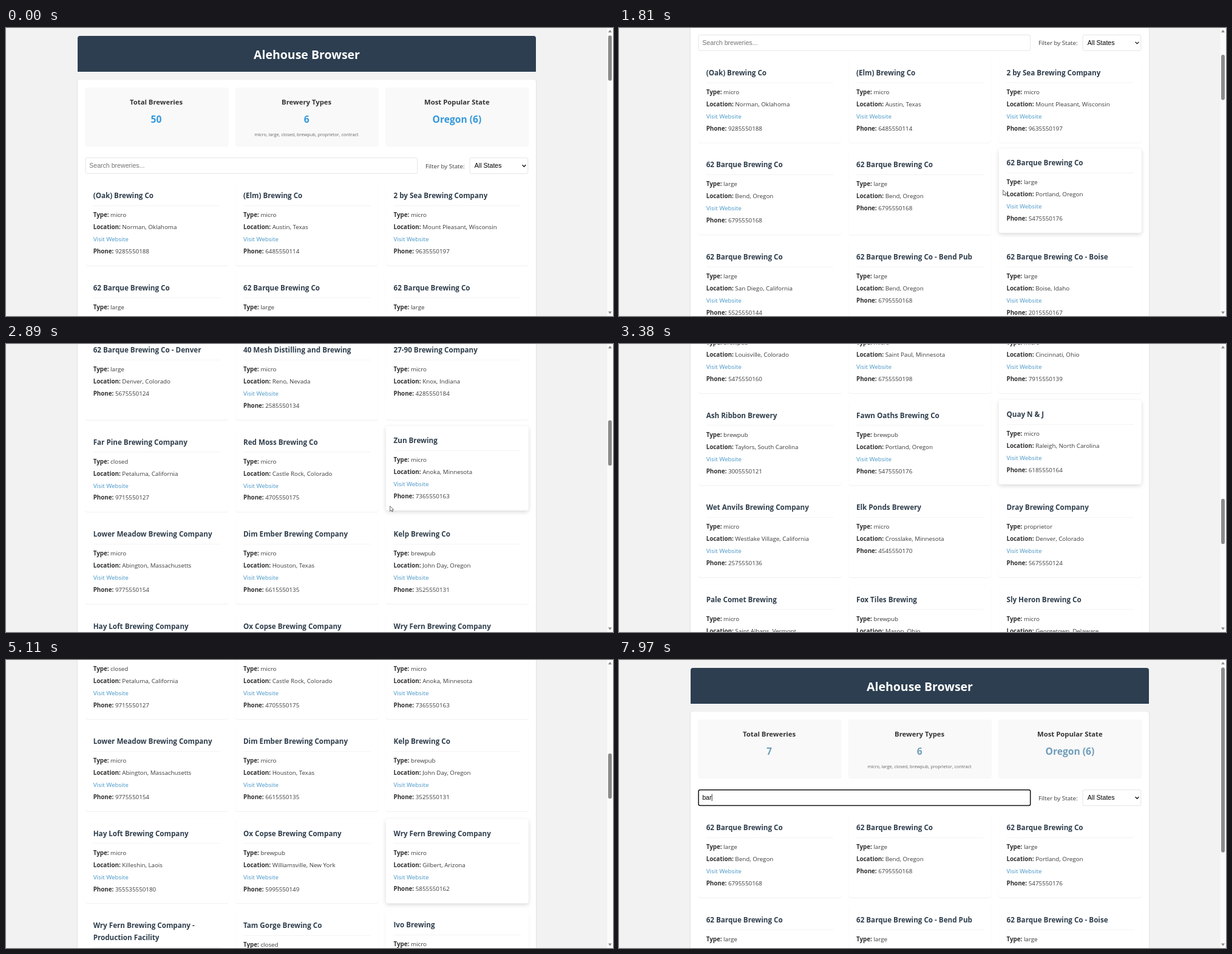
Animation of 1000 by 474 pixels, one loop 8000 ms. Source, as an HTML page:

```html
<!DOCTYPE html>
<html lang="en">
<head>
<meta charset="utf-8">
<title>Alehouse Browser</title>
<style>
  html, body { margin: 0; width: 100%; height: 100%; overflow: hidden; background: #f2f2f2; }
  svg { display: block; width: 100vw; height: 100vh; }
  text { font-family: "Open Sans", "Noto Sans", sans-serif; font-size: 9.8px; fill: #3b3b3b; white-space: pre; }
  .b { font-weight: 700; fill: #303030; }
  .h1 { font-size: 19.5px; font-weight: 700; fill: #fff; text-anchor: middle; }
  .label { font-size: 11.3px; font-weight: 700; fill: #333; text-anchor: middle; }
  .value { font-size: 15.6px; font-weight: 700; text-anchor: middle; }
  .small { font-size: 7.36px; fill: #666; text-anchor: middle; }
  .name { font-size: 11.65px; font-weight: 700; fill: #2f3e4c; }
  .link { fill: #4595c6; }
  .ui { font-family: "Liberation Sans", Arial, sans-serif; font-size: 10.6px; fill: #000; }
  .hint { fill: #757575; }
</style>
</head>
<body>
<svg id="stage" viewBox="0 0 1000 474" xmlns="http://www.w3.org/2000/svg">
  <defs>
    <filter id="blur" x="-10%" y="-15%" width="120%" height="130%"><feGaussianBlur stdDeviation="3.6"/></filter>
  </defs>
</svg>
<script>
const LOOP = 8000, VIEW = 474, TOP = 252, CARD = 139, GAP = 12.5, LINE = 19.9, WRAP = 19.5;
const COLS = [131, 378.3, 625.8], CARD_W = 235;
const TYPES = { m: 'micro', l: 'large', c: 'closed', b: 'brewpub', p: 'proprietor', k: 'contract' };

// name; type; place; flags: "-" no website, "x" no phone. "/" breaks a long name.
const breweries = `(Oak) Brewing Co;m;Norman, Oklahoma
(Elm) Brewing Co;m;Austin, Texas
2 by Sea Brewing Company;m;Mount Pleasant, Wisconsin
62 Barque Brewing Co;l;Bend, Oregon
62 Barque Brewing Co;l;Bend, Oregon;-
62 Barque Brewing Co;l;Portland, Oregon
62 Barque Brewing Co;l;San Diego, California
62 Barque Brewing Co - Bend Pub;l;Bend, Oregon;-
62 Barque Brewing Co - Boise;l;Boise, Idaho
62 Barque Brewing Co - Denver;l;Denver, Colorado;-
40 Mesh Distilling and Brewing;m;Reno, Nevada
27-90 Brewing Company;m;Knox, Indiana;-
Far Pine Brewing Company;c;Petaluma, California
Red Moss Brewing Co;m;Castle Rock, Colorado
Zun Brewing;m;Anoka, Minnesota
Lower Meadow Brewing Company;m;Abington, Massachusetts
Dim Ember Brewing Company;m;Houston, Texas
Kelp Brewing Co;b;John Day, Oregon
Hay Loft Brewing Company;m;Killeshin, Laois
Ox Copse Brewing Company;b;Williamsville, New York
Wry Fern Brewing Company;m;Gilbert, Arizona
Wry Fern Brewing Company -/Production Facility;m;Mesa, Arizona
Tam Gorge Brewing Co;c;Prescott, Arizona
Ivo Brewing;m;San Diego, California
Dusk Larch Brewing;b;Louisville, Colorado
Six Plum Brewing Co;m;Saint Paul, Minnesota
Vole Run Brewery;m;Cincinnati, Ohio
Ash Ribbon Brewery;b;Taylors, South Carolina
Fawn Oaths Brewing Co;b;Portland, Oregon
Quay N & J;m;Raleigh, North Carolina
Wet Anvils Brewing Company;m;Westlake Village, California
Elk Ponds Brewery;m;Crosslake, Minnesota;-
Dray Brewing Company;p;Denver, Colorado
Pale Comet Brewing;m;Saint Albans, Vermont
Fox Tiles Brewing;b;Mason, Ohio
Sly Heron Brewing Co;m;Georgetown, Delaware
Kiln Stone Brewpub;b;Utica, New York
Moor Brewing Company;k;Frederick, Maryland
Gull Cove Brewing;b;Wilmington, North Carolina
Loam Brewing Company;m;Akron, Ohio
Teal Post Brewing;m;Tampa, Florida
Nine Reeds Brewery;m;Salem, Oregon
Mink Brewery;m;okolona, Mississippi;-
Toll Brewing Company;m;Milwaukee, Wisconsin
Reed Brewing Company;m;Mariposa, California;x
Plum Alley Brewery;m;Gary, Indiana;x
Plum Alley Brewery;m;Hammond, Indiana;-x
Sage Brewing Company;m;Assumption, Illinois
Flax Brewing;m;Tucson, Arizona
Orb Brewing;m;Kenmore, Washington`.split('\n').map(row => {
  const [name, type, place, flags = ''] = row.split(';');
  return { name, type: TYPES[type], place, site: !flags.includes('-'), phone: flags.includes('x') ? 'N/A' : phoneFor(place) };
});

function phoneFor(place) {
  let h = 7;
  for (const c of place) h = (h * 31 + c.charCodeAt(0)) % 99991;
  return (place.endsWith('Laois') ? '35' : '') + (200 + h % 790) + '55501' + (10 + h % 89);
}

const svg = document.getElementById('stage');
function add(parent, tag, attrs = {}, text) {
  const el = document.createElementNS('http://www.w3.org/2000/svg', tag);
  for (const k in attrs) el.setAttribute(k, attrs[k]);
  if (text !== undefined) el.textContent = text;
  parent.appendChild(el);
  return el;
}
const box = (p, x, y, width, height, rx, fill, more) => add(p, 'rect', { x, y, width, height, rx, fill, ...more });
const label = (p, cls, x, y, text) => add(p, 'text', { class: cls, x, y }, text);
const show = (el, on) => el.setAttribute('display', on ? 'inline' : 'none');

function field(p, y, key, value) {
  const t = add(p, 'text', { x: 12.7, y });
  add(t, 'tspan', { class: 'b' }, key + ':');
  add(t, 'tspan', {}, ' ' + value);
}

function drawCard(parent, data, x, y, h) {
  const g = add(parent, 'g');
  const shadow = box(g, 0, 2.5, CARD_W, h, 4, '#000', { filter: 'url(#blur)', display: 'none' });
  const rim = add(g, 'g');
  box(rim, -.3, .3, CARD_W + .6, h + 1, 4, '#000', { opacity: .025 });
  box(rim, 0, .3, CARD_W, h + .4, 4, '#000', { opacity: .045 });
  box(g, 0, 0, CARD_W, h, 4, '#fff');
  const lines = data.name.split('/');
  lines.forEach((s, i) => label(g, 'name', 12.7, 28.3 + i * WRAP, s));
  let ty = 59.2 + (lines.length - 1) * WRAP;
  box(g, 12.7, ty - 19.2, CARD_W - 25.4, .8, 0, '#f0f0f0');
  field(g, ty, 'Type', data.type);
  field(g, ty += LINE + .2, 'Location', data.place);
  if (data.site) label(g, 'link', 12.7, ty += LINE, 'Visit Website');
  field(g, ty + LINE, 'Phone', data.phone);
  const place = lift => g.setAttribute('transform', `translate(${x} ${y - lift})`);
  place(0);
  return { shadow, rim, place };
}

// Lays out three cards per row and returns the cards and the page height.
function drawGrid(parent, list) {
  const g = add(parent, 'g'), cards = [];
  let y = TOP;
  for (let i = 0; i < list.length; i += 3) {
    const row = list.slice(i, i + 3);
    const h = CARD + (row.some(d => d.name.includes('/')) ? WRAP : 0) - (row.some(d => d.site) ? 0 : LINE);
    row.forEach((d, c) => cards.push(drawCard(g, d, COLS[c], y, h)));
    y += h + GAP;
  }
  return { g, cards, height: y + 13.5 };
}

// Page
box(svg, 0, 0, 1000, VIEW, 0, '#f2f2f2');
const page = add(svg, 'g');
add(page, 'path', { d: 'M118 72V17a4 4 0 0 1 4-4H869a4 4 0 0 1 4 4V72Z', fill: '#2c3e50' });
label(page, 'h1', 495.5, 50.5, 'Alehouse Browser');
const edges = [2, 1].map(d => box(page, 118 - d, 85 - d + 1, 755 + 2 * d, 0, 4, '#000', { opacity: .018 }));
const panel = box(page, 118, 85, 755, 0, 4, '#fff');

const stats = [['Total Breweries', '50'], ['Brewery Types', '6'], ['Most Popular State', 'Oregon (6)']].map(([head, val], i) => {
  const x = COLS[i], mid = x + CARD_W / 2 - 1 + .3 * i;
  box(page, x - .5, 98, CARD_W + 1, 97, 4, '#000', { opacity: .04 });
  box(page, x, 98, CARD_W, 96, 4, '#f9f9f9');
  label(page, 'label', mid, 125.7, head);
  return label(page, 'value', mid, 156.3, val);
});
label(page, 'small', 495, 177.6, 'micro, large, closed, brewpub, proprietor, contract');

const input = box(page, 131, 213.7, 546.7, 25.8, 2.5, '#fff');
const hint = label(page, 'ui hint', 137.2, 230, 'Search breweries...');
const typed = label(page, 'ui', 137.2, 230.4, '');
const caret = box(page, 137.4, 220.5, .8, 11.5, 0, '#000');
label(page, '', 691, 230.5, 'Filter by State:');
box(page, 764, 213.7, 95.8, 26, 2.5, '#fff', { stroke: '#ddd', 'stroke-width': .8 });
label(page, 'ui', 771.8, 230.4, 'All States');
add(page, 'path', { d: 'M850.6 225.2l2.9 3 2.9-3', fill: 'none', stroke: '#111', 'stroke-width': 1.3 });

const full = drawGrid(page, breweries);
const found = drawGrid(page, breweries.filter(d => d.name.toLowerCase().includes('ba')));

// Scrollbar and pointer
box(svg, 990.5, 0, 9.5, VIEW, 0, '#fbfbfb');
const thumb = box(svg, 992, 12, 6, 75, 3, '#8b8b8b');
add(svg, 'path', { d: 'M992 7.3L995 3L998 7.3ZM992 466.5L995 470.8L998 466.5Z', fill: '#8b8b8b' });
const pointer = add(svg, 'path', {
  d: 'M0 0V8.4L2 6.6L3.3 9.4L4.6 8.8L3.4 6.1H6Z', fill: '#fff', stroke: '#444', 'stroke-width': .8
});

// Motion
const clamp = v => Math.max(0, Math.min(1, v));
const NOTCH = 67.45, END = full.height - VIEW;
const SCROLL = [[0, 0], [1200, 0], [1690, 3 * NOTCH], [1910, 3 * NOTCH], [2010, 5 * NOTCH], [2170, 5 * NOTCH],
  [2370, 8 * NOTCH], [2510, 8 * NOTCH], [2610, 10 * NOTCH], [2850, 10 * NOTCH], [3120, 21 * NOTCH], [3280, 21 * NOTCH],
  [3380, 1541.5], [3460, 1541.5], [4040, END], [4410, END], [5110, 899.5], [5210, 899.5], [5980, 0], [LOOP, 0]];
// start, end, row
const HOVERS = [[1650, 1915, 1], [2010, 2180, 2], [2225, 2510, 3], [2610, 2850, 4], [3120, 3280, 9],
  [4385, 4415, 15], [4700, 4975, 7], [5105, 5220, 6], [5990, 6070, 0]];

function scrollAt(t) {
  const i = SCROLL.findIndex(k => k[0] > t);
  const [t0, a] = SCROLL[i - 1], [t1, b] = SCROLL[i];
  const u = (t - t0) / (t1 - t0);
  return a + (b - a) * u * u * (3 - 2 * u);
}

function hover(t) {
  for (const [start, end, row] of HOVERS) {
    const card = full.cards[row * 3 + 2];
    const out = 1 - clamp((t - end) / 200);
    const on = t >= start && out > 0;
    card.place(on ? 3 * clamp((Math.min(t, end) - start) / 150) * out : 0);
    show(card.shadow, on);
    show(card.rim, !on);
    card.shadow.setAttribute('opacity', .15 * clamp(4 * out - 1));
  }
}

function render(t) {
  const keys = t < 7820 ? 0 : t < 7900 ? 1 : t < 7970 ? 2 : 3;
  const narrow = keys > 1, focus = t >= 6280;
  const grid = narrow ? found : full, y = scrollAt(t);
  show(full.g, !narrow);
  show(found.g, narrow);
  page.setAttribute('transform', `translate(0 ${-y.toFixed(2)})`);
  panel.setAttribute('height', grid.height - 98);
  edges.forEach((e, i) => e.setAttribute('height', grid.height - 98 + 2 * (2 - i)));
  thumb.setAttribute('y', 12.2 + y / grid.height * 450);
  thumb.setAttribute('height', VIEW / grid.height * 450);

  stats[0].textContent = narrow ? found.cards.length : keys ? 49 : 50;
  for (const s of stats) s.style.fill = t < 5210 ? '#3498db' : '#6f9dba';
  input.setAttribute('stroke', focus ? '#111' : '#ddd');
  input.setAttribute('stroke-width', focus ? 1.5 : .8);
  show(hint, !keys);
  typed.textContent = 'bar'.slice(0, keys);
  caret.setAttribute('x', 137.4 + (keys ? typed.getComputedTextLength() : 0));
  show(caret, focus && (t < 6820 || t >= 7340));
  hover(t);

  const u = 1 - Math.pow(1 - clamp((t - 950) / 280), 3);
  show(pointer, t >= 950 && t < 3280);
  pointer.setAttribute('transform', `translate(${665 - 32.3 * u} ${480 - 213.2 * u})`);
}

const began = performance.now();
function tick() {
  render((performance.now() - began) % LOOP);
  requestAnimationFrame(tick);
}
tick();
</script>
</body>
</html>
```
